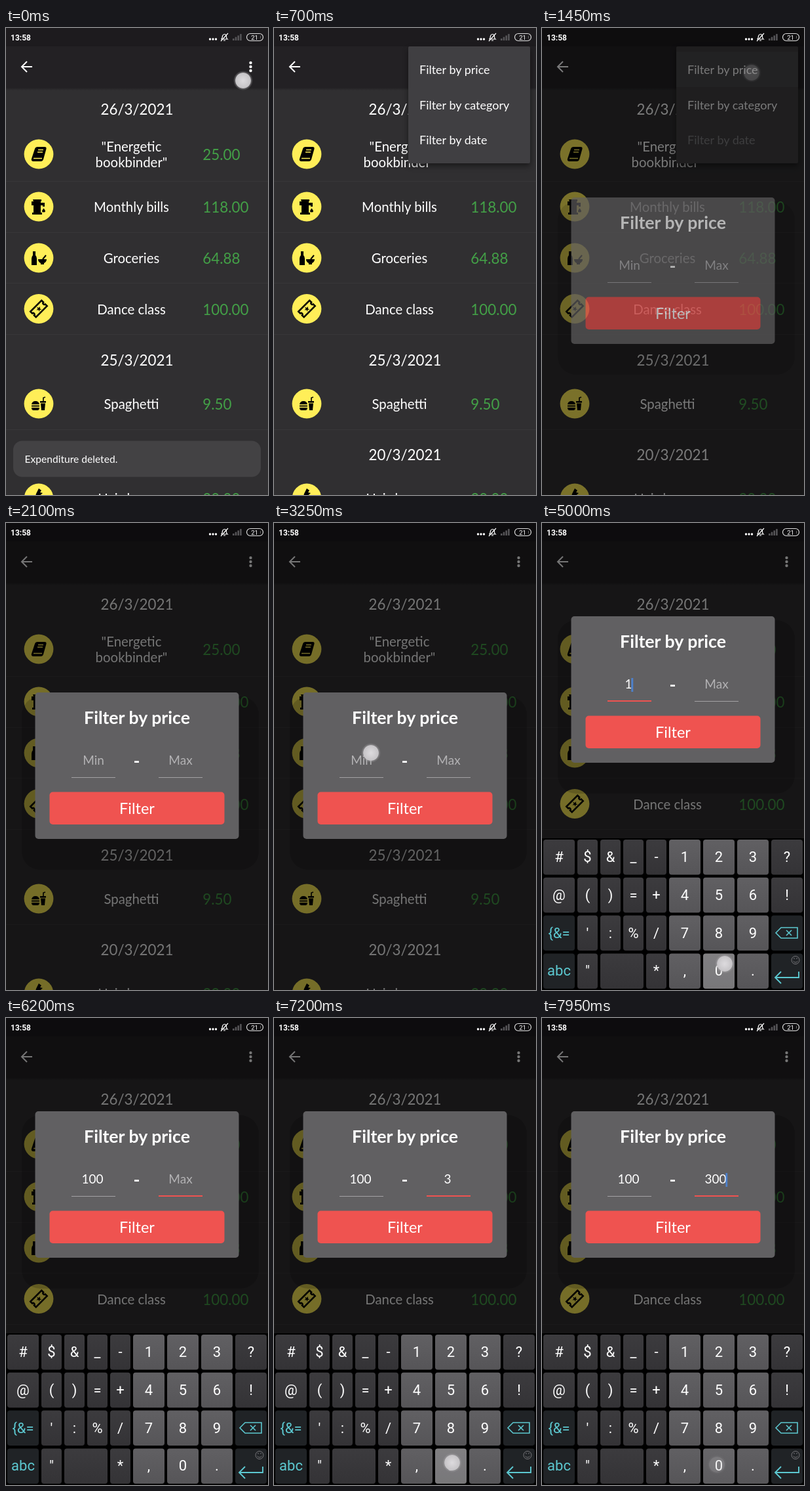
An HTML page for the animation above (8 s loop, 400 by 711 pixels).

```html
<!DOCTYPE html>
<html lang="en">
<head>
<meta charset="utf-8">
<title>Filter by price</title>
<style>
  html, body { margin: 0; width: 100%; height: 100%; overflow: hidden; background: #000; }
  svg { display: block; width: 100%; height: 100%; font-family: Lato, sans-serif; fill: #fff; }
  .mid { text-anchor: middle; }
  .date, .amount { font-size: 22.4px; }
  .amount { fill: #43a047; }
  .label { font-size: 20.4px; }
  .item { font-size: 18px; }
  .field { font-size: 19px; }
  .title { font-size: 26.7px; font-weight: 700; }
  .hint { fill: #b3b2b4; }
  .icon { fill: #000; }
  .key { font: 22px Roboto, sans-serif; }
  .line { fill: none; stroke: #fff; stroke-width: 2; }
  #menu { filter: drop-shadow(0 4px 4px #0007); }
  #panel { transform-origin: 391px 28px; }
</style>
</head>
<body>
<svg id="stage" viewBox="0 0 400 711"></svg>
<script>
const LOOP = 8000;
const YELLOW = '#ffee58', RED = '#ef5350', CYAN = '#5cc8d0';

const text = (x, y, cls, str, extra = '') => `<text x="${x}" y="${y}" class="${cls}" ${extra}>${str}</text>`;
const rect = (x, y, w, h, fill, rx = 0, extra = '') =>
  `<rect x="${x}" y="${y}" width="${w}" height="${h}" fill="${fill}" rx="${rx}" ${extra}/>`;

const icons = {
  book: `<path d="M-2-11H9q3 0 2.500 3L7 8q-1 3-4 3H-8q-4 0-3-4L-6-8q1-3 4-3z"/>
    <path d="M-1-6.500H7M-2-3H6M-8 6.500H5" stroke="${YELLOW}" stroke-width="1.500"/>`,
  tap: `<path d="M-9-11H4v3H3v2H9V0H6V-2H3V9h2v3H-10V9h2V-2h-3v-6h3z"/>
    <path d="M7.500 2.500q5 6 0 6t0-6z"/>`,
  food: `<path d="M-9-10h4v6q2 2 2 5v10h-8V1q0-3 2-5zM-1 2H12q0 4-4 6v2H3V8Q-1 6-1 2z"/>
    <path d="M6 2L11-4" stroke="#000" stroke-width="2"/>`,
  ticket: `<g transform="rotate(-45)"><path d="M-12-6H12v4a2 2 0 0 0 0 4v4H-12V2a2 2 0 0 0 0-4z"
    fill="none" stroke="#000" stroke-width="2.500"/><path d="M0-4l1 3h3L1.500 1l1 3L0 2l-2.500 2 1-3L-4-1h3z"/></g>`,
  burger: `<path d="M-11 1q1-5 6-5t6 5zM-11 2.500H1v2H-11zM-11 6H1q0 4-3 4h-6q-3 0-3-4zM2-4H11v2.500H2zM3-.5h7L9 10H4z"/>
    <path d="M7-4V-9l3-1" stroke="#000" stroke-width="1.600" fill="none"/>`,
  cut: `<path d="M0-15l4 3-2 3 4 1L-7 4l3-11z"/>`
};

function row(y, icon, lines, amount) {
  const first = lines.length > 1 ? y - 4 : y + 8;
  return `<circle cx="50" cy="${y}" r="22.400" fill="${YELLOW}"/>
    <g class="icon" transform="translate(50 ${y})">${icons[icon]}</g>` +
    lines.map((s, i) => text(191.5, first + 24 * i, 'label mid', s)).join('') +
    text(300.3, y + 9, 'amount', amount);
}
const date = (y, s) => text(200, y, 'date mid', s);
const dividers = ys => ys.map(y => rect(0, y, 400, 1, '#383739')).join('');

const list = rect(0, 0, 400, 711, '#302f31') + date(132, '26/3/2021') +
  row(192, 'book', ['"Energetic', 'bookbinder"'], '25.00') +
  row(272, 'tap', ['Monthly bills'], '118.00') +
  row(350, 'food', ['Groceries'], '64.88') +
  row(427.5, 'ticket', ['Dance class'], '100.00') +
  dividers([233, 311, 388, 466]) +
  `<g id="lower">${date(514, '25/3/2021')}${row(572, 'burger', ['Spaghetti'], '9.50')}
    ${dividers([611])}${date(658, '20/3/2021')}${row(716, 'cut', ['Hairdresser'], '30.00')}</g>`;

const header = rect(0, 0, 400, 91, '#232124') + rect(0, 0, 400, 28, '#1d1b1e') +
  rect(0, 91, 400, 4, 'url(#edge)') +
  '<path class="line" d="M40 59H24M32 51l-8 8 8 8"/>' +
  [53, 59, 65].map(y => `<circle cx="373.500" cy="${y}" r="2.200"/>`).join('') +
  '<circle id="ripple" cx="373" cy="59" r="39"/>';

const snackbar = `<g id="snack">${rect(11, 628.5, 378, 55, '#434244', 14)}
  ${text(28.5, 662, '', 'Expenditure deleted.', 'font-size="15.6"')}</g>`;

const menu = `<g id="menu">${rect(205, 28, 186, 178, '#403f42', 2, 'id="panel"')}
  ${rect(205, 36, 186, 54, '#fff', 0, 'id="pressed"')}
  ${['price', 'category', 'date'].map((s, i) =>
    text(222, 70 + 53.5 * i, 'item', 'Filter by ' + s, `id="item${i}"`)).join('')}</g>`;

function field(id, x, hint, values) {
  return rect(x - 33.5, 387, 67, 1, '#a3a1a4') +
    rect(x - 33.5, 386, 67, 2, RED, 0, `id="${id}Focus"`) +
    text(x, 368, 'field hint mid', hint, `id="${id}Hint"`) +
    values.map((v, i) => text(x - 1.5, 368, 'field mid', v, `id="${id}${i}"`)).join('');
}
const dialog = `<g id="dialog"><g id="lift">
  ${rect(24, 264, 362, 264, '#000', 28, 'opacity=".16"')}
  ${rect(44.5, 258, 311, 223, '#616062', 5)}
  ${text(200, 306, 'title mid', 'Filter by price')}${text(199.5, 371.5, 'title mid', '-')}
  ${field('min', 133.5, 'Min', ['1', '10', '100'])}${field('max', 266.5, 'Max', ['3', '30', '300'])}
  ${rect(0, 352, 2.5, 21, '#4a86dc', 0, 'id="caret"')}
  ${rect(66.5, 409.5, 267, 49.5, RED, 5)}${text(200, 443, 'mid', 'Filter', 'font-size="23.5"')}</g></g>`;

const status = text(7, 18.5, '', '13:58', 'style="font:700 12px Roboto,sans-serif"') +
  [311.5, 316, 320.5].map(x => `<circle cx="${x}" cy="17" r="1.700"/>`).join('') +
  `<path class="line" style="stroke-width:1.200" d="M328.500 17q2-1 2-5 1-2.500 3-2.500 3 0 3 4 0 2.500 1.500 3.500zM332 19h3M328 20L339 8"/>` +
  [0, 1, 2, 3].map(i => rect(346 + 3.7 * i, 16 - 2.3 * i, 2.6, 3 + 2.3 * i, '#555457')).join('') +
  rect(367.5, 8.5, 25, 11, 'none', 5.5, 'stroke="#ddd" stroke-width="1.2"') +
  text(379.5, 17.5, 'mid', '21', 'style="font:9.5px Roboto,sans-serif"') +
  '<path d="M388 11q2 3 0 6z" fill="#777"/>';

const colX = [2, 54, 89, 124, 159, 194, 246, 298, 350];
const keyRows = ['# $ & _ - 1 2 3 ?', '@ ( ) = + 4 5 6 !', "{&= ' : % / 7 8 9 back", 'abc " space - * , 0 . enter'];
const keyTop = r => 482 + 57.8 * r;
const escapeKey = s => s.replace(/&/g, '&amp;');

function key(name, r, c) {
  if (r === 3 && c === 3) return '';
  const y = keyTop(r), isNumber = c > 4 && c < 8, isTool = r > 1 && (c === 0 || c === 8);
  const w = name === 'space' ? 66 : c && c < 5 ? 31 : 48;
  const cap = rect(colX[c], y, w, 53.5, isTool ? '#202326' : isNumber ? 'url(#light)' : 'url(#dark)', 4);
  if (w === 66 || (isTool && c)) return cap;
  return cap + text(colX[c] + w / 2, y + 34, 'key mid', escapeKey(name), isTool ? `fill="${CYAN}"` : '');
}
const keyboard = `<g id="keyboard">${rect(0, 480, 400, 231, '#000')}
  ${keyRows.map((s, r) => s.split(' ').map((k, c) => key(k, r, c)).join('')).join('')}
  <g fill="none" stroke="${CYAN}" stroke-width="1.600">
    <path d="M357 624l8-8H390V632H365zM373 620l8 8M381 620l-8 8"/>
    <path d="M392 683V692H356M365 683l-9 9 9 9" stroke-width="1.900"/></g>
  <g fill="none" stroke="#77767a"><circle cx="387" cy="665.500" r="6"/>
    <path d="M383.500 667q3.500 4 7 0M385 662v2M389 662v2"/></g>
  ${[['one', 5, 0], ['three', 7, 0], ['zero', 6, 3]].map(([id, c, r]) =>
    rect(colX[c], keyTop(r), 48, 53.5, '#fff', 4, `id="${id}"`)).join('')}</g>`;

const gradient = (id, a, b) => `<linearGradient id="${id}" x2="0" y2="1">
  <stop stop-color="${a}"/><stop offset="1" stop-color="${b}"/></linearGradient>`;

document.getElementById('stage').innerHTML = `<defs>
  ${gradient('edge', '#232124', '#302f31')}${gradient('light', '#616063', '#565558')}${gradient('dark', '#3c3b3e', '#343336')}
  <radialGradient id="finger"><stop stop-color="#dddbde"/><stop offset=".76" stop-color="#c6c4c7"/>
    <stop offset=".82" stop-color="#aaa8ab" stop-opacity=".45"/>
    <stop offset="1" stop-color="#aaa8ab" stop-opacity="0"/></radialGradient></defs>` +
  list + header + snackbar + menu + rect(0, 0, 400, 711, '#000', 0, 'id="barrier"') +
  dialog + status + keyboard + '<g id="touch"><circle r="15" fill="url(#finger)"/></g>';

// Each step is [time, value, easing]. The end values are held to the loop's ends;
// of several steps at one time the last one counts.
function play(id, prop, steps, ease = 'linear') {
  const all = [[0, steps[0][1], 'step-end'], ...steps, [LOOP, steps[steps.length - 1][1]]];
  const byTime = new Map(all.map(step => [step[0], step]));
  document.getElementById(id).animate(
    [...byTime.values()].map(([t, v, e = ease]) => ({ offset: t / LOOP, [prop]: v, easing: e })),
    { duration: LOOP, iterations: Infinity });
}
const show = (id, ...spans) =>
  play(id, 'opacity', [[0, 0], ...spans.flatMap(([a, b]) => [[a, 1], [b, 0]])], 'step-end');

// Opens over 300 ms and closes in reverse; a and b are fractions of that run.
function unfold(id, prop, a, b, from, to) {
  const open = 200, close = 1685;
  play(id, prop, [[open + 300 * a, from], [open + 300 * b, to], [close - 300 * b, to], [close - 300 * a, from]]);
}

play('ripple', 'opacity', [[40, 0], [150, 0.13], [420, 0]]);
play('snack', 'opacity', [[150, 1], [400, 0]]);

unfold('menu', 'opacity', 0, 1 / 3, 0, 1);
unfold('panel', 'transform', 0, 2 / 3, 'scale(.6,.05)', 'scale(1,1)');
[0, 1, 2].forEach(i => unfold('item' + i, 'opacity', (i + 1) / 4.5, (i + 2.5) / 4.5, 0, 1));
play('pressed', 'opacity', [[1250, 0], [1350, 0.07], [1600, 0]]);

play('barrier', 'opacity', [[1350, 0], [1450, 0.52], [1550, 0.54]]);
play('dialog', 'opacity', [[1350, 0], [1450, 0.68], [1550, 1]]);

// The list shrinks at once while the dialog and keyboard glide.
show('lower', [0, 3950]);
const glide = (id, from, to, start, span, power) => play(id, 'transform',
  Array.from({ length: 11 }, (_, i) =>
    [start + span * i / 10, `translateY(${to + (from - to) * (1 - i / 10) ** power}px)`]));
glide('lift', 0, -116, 3950, 100, 2);
glide('keyboard', 231, 0, 3950, 250, 4.22);

show('minFocus', [3450, 5700]);
show('maxFocus', [5700, LOOP]);
show('minHint', [0, 4600]);
show('maxHint', [0, 6600]);
show('min0', [4600, 5050]);
show('min1', [5050, 5350]);
show('min2', [5350, LOOP]);
show('max0', [6600, 7250]);
show('max1', [7250, 7850]);
show('max2', [7850, LOOP]);

const caret = [[3450, 3950, 132], [4450, 4600, 132], [4600, 5050, 136.5], [5050, 5350, 142], [5350, 5700, 147.5],
  [5700, 6200, 264], [6600, 7100, 269.5], [7250, 7750, 275], [7850, LOOP, 280.5]];
show('caret', ...caret);
play('caret', 'transform', caret.map(([t, , x]) => [t, `translateX(${x}px)`]), 'step-end');

// [down, up, x, y, key]
const taps = [[0, 100, 362, 80], [1250, 1350, 320, 68], [3200, 3400, 148, 350], [4500, 4600, 219, 514, 'one'],
  [4950, 5050, 279, 671, 'zero'], [5250, 5350, 277, 673, 'zero'], [5600, 5700, 268, 248],
  [6500, 6600, 342, 519, 'three'], [7150, 7250, 272, 677, 'zero'], [7750, 7850, 267, 680, 'zero']];
const pulse = (list, level, fade) => list.flatMap(([down, up]) =>
  [[down, level], [up, level], [up + fade, 0, 'step-end']]);
play('touch', 'opacity', pulse(taps, 1, 130));
play('touch', 'transform', taps.map(([t, , x, y]) => [t, `translate(${x}px,${y}px)`]), 'step-end');
['one', 'three', 'zero'].forEach(k =>
  play(k, 'opacity', [[0, 0, 'step-end'], ...pulse(taps.filter(t => t[4] === k), 0.2, 130)]));
</script>
</body>
</html>
```
